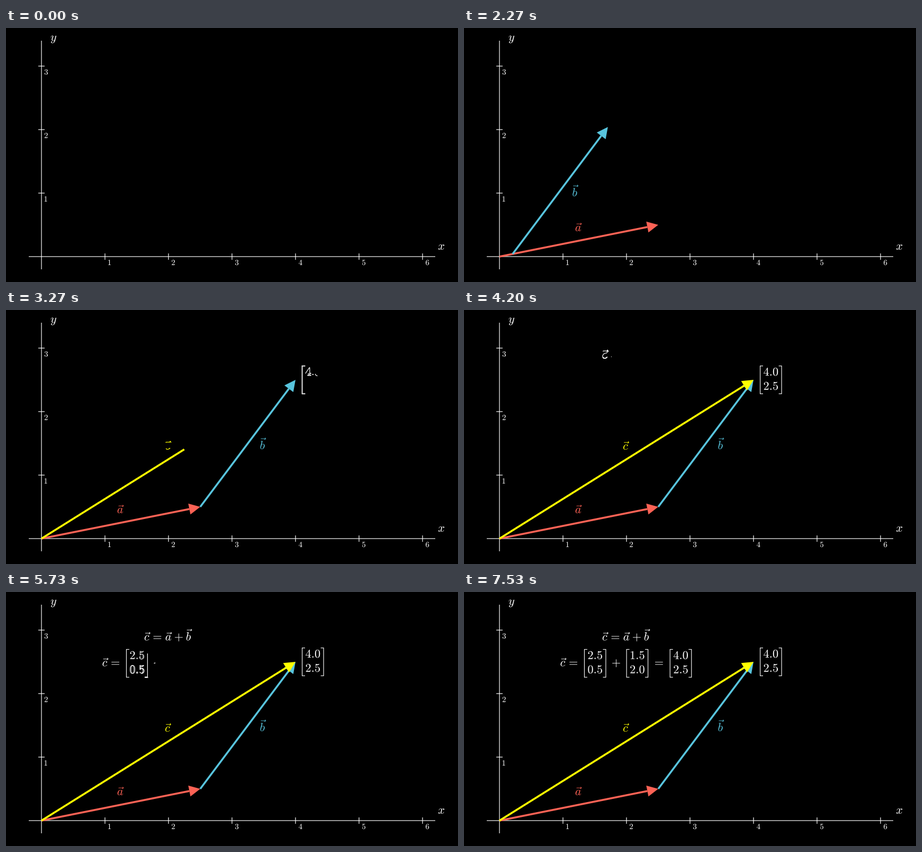
Recreate the animation shown at these times as a matplotlib script. Size 854x480 px, loop 10 s.

```python
import numpy as np
import matplotlib.pyplot as plt
from matplotlib.animation import FuncAnimation
from matplotlib.colors import to_rgb
from matplotlib.patches import PathPatch
from matplotlib.path import Path
from matplotlib.textpath import TextPath

plt.rcParams["mathtext.fontset"] = "cm"

W, H, DPI = 854, 480, 64
FPS, FRAMES = 15, 150
EM, SMALL_EM = 22.4, 14.95
ORIGIN, UNIT = np.array([67.0, 432.0]), 120
WHITE, RED, BLUE, YELLOW = "#FFFFFF", "#FC6255", "#58C4DD", "#FFFF00"
ADVANCE = {"a": 0.529, "b": 0.429, "c": 0.433, "=": 0.778, "+": 0.778, ".": 0.278}

fig = plt.figure(figsize=(W / DPI, H / DPI), dpi=DPI, facecolor="black")
ax = fig.add_axes([0, 0, 1, 1])
ax.set_xlim(0, W)
ax.set_ylim(H, 0)
ax.axis("off")


def points(px):
    return px * 72 / DPI


def smooth(t):
    t = min(max(t, 0), 1)
    edge = 1 / (1 + np.exp(5))
    return (1 / (1 + np.exp(-10 * (t - 0.5))) - edge) / (1 - 2 * edge)


def to_screen(x, y):
    return ORIGIN + UNIT * np.array([x, -y])


def compound(polys):
    return Path.make_compound_path(*[Path(p) for p in polys])


def partial(polys, fraction):
    """First part of the outlines, counted in segments."""
    left = fraction * sum(len(p) - 1 for p in polys)
    kept = []
    for p in polys:
        if left <= 1e-6:
            break
        whole = int(min(left, len(p) - 1))
        piece = p[:whole + 1]
        rest = left - whole
        if whole < len(p) - 1 and rest > 0:
            piece = np.vstack([piece, p[whole] + rest * (p[whole + 1] - p[whole])])
        kept.append(piece)
        left -= len(p) - 1
    return kept


# ---- outlines of symbols -------------------------------------------------

def outline(tex, em):
    path = TextPath((0, 0), f"${tex}$", size=100)
    return [p * [em / 100, -em / 100] for p in path.to_polygons()]


def bounds(polys):
    everything = np.vstack(polys)
    return everything.min(axis=0), everything.max(axis=0)


def char(c, x, y):
    """Symbol centred in its advance width, on baseline y."""
    polys = outline(c, EM)
    low, high = bounds(polys)
    shift = [x + ADVANCE.get(c, 0.5) * EM / 2 - (low[0] + high[0]) / 2, y]
    return [p + shift for p in polys]


def vector_symbol(letter, x, y):
    body = char(letter, x, y)
    low, high = bounds(body)
    arrow = min(outline(r"\vec{c}", EM), key=lambda p: p[:, 1].mean())
    a_low, a_high = bounds([arrow])
    rise = 0.879 if letter == "b" else 0.615
    centre = np.array([(low[0] + high[0]) / 2 + 0.075 * EM, y - rise * EM])
    return [[arrow + centre - (a_low + a_high) / 2], body]


def bracket(x, y, side):
    """Square bracket with its upright at x; side is 1 for left, -1 for right."""
    h, foot, t = 1.2 * EM, 6 * side, 1.15
    s = t * side
    shape = [(0, h), (foot, h), (foot, h - t), (s, h - t), (s, t - h),
             (foot, t - h), (foot, -h), (0, -h), (0, h)]
    return [np.array(shape) + [x, y]]


def matrix(x, y, rows):
    """Column of two numbers; x is the cell's left edge, y the centre."""
    parts = [bracket(x - 6.5, y, 1)]
    for number, drop in zip(rows, (-0.36, 0.84)):
        cursor = x
        for c in number:
            parts.append(char(c, cursor, y + drop * EM))
            cursor += ADVANCE.get(c, 0.5) * EM
    return parts + [bracket(x + 1.278 * EM + 6.5, y, -1)]


def equation(x, y, tokens):
    parts = []
    for token in tokens:
        if token in ("=", "+"):
            gap = (0.278 if token == "=" else 0.222) * EM
            parts.append(char(token, x + gap, y))
            x += ADVANCE[token] * EM + 2 * gap
        elif token in ("a", "b", "c"):
            parts += vector_symbol(token, x, y)
            x += ADVANCE[token] * EM
        else:
            parts += matrix(x + 0.528 * EM, y - 0.25 * EM, token.split())
            x += (1.278 + 2 * 0.528) * EM
    return parts


# ---- animated parts ------------------------------------------------------

class Glyph:
    def __init__(self, polys, color, zorder=5):
        self.polys, self.rgb = polys, to_rgb(color)
        self.patch = PathPatch(compound(polys), zorder=zorder, snap=False, visible=False)
        ax.add_patch(self.patch)

    def draw(self, progress, opacity=1, shift=(0, 0)):
        """Trace the border in the first half, fill it in the second."""
        self.patch.set_visible(progress > 0 and opacity > 0)
        if not self.patch.get_visible():
            return
        border = min(2 * progress, 1)
        fill = min(max(2 * progress - 1, 0), 1)
        moved = [p + np.asarray(shift) for p in self.polys]
        self.patch.set_path(compound(partial(moved, border)))
        self.patch.set_facecolor((*self.rgb, fill * opacity))
        self.patch.set_edgecolor((*self.rgb, 1) if fill < 0.999 else "none")
        self.patch.set_linewidth(points(1.2 * (1 - fill)))


class Writing:
    def __init__(self, parts, color, start, run=1):
        self.glyphs = [Glyph(p, color) for p in parts]
        self.start, self.run = start, run

    def draw(self, t, opacity=1, shift=(0, 0)):
        n = len(self.glyphs)
        lag = min(4 / n, 0.2)
        alpha = min(max((t - self.start) / self.run, 0), 1)
        value = alpha * ((n - 1) * lag + 1)
        for i, glyph in enumerate(self.glyphs):
            glyph.draw(value - i * lag, opacity, shift)


class Arrow:
    SIZE = 21

    def __init__(self, end, color, start, zorder):
        tail, tip = to_screen(0, 0), to_screen(*end)
        d = (tip - tail) / np.hypot(*(tip - tail))
        side = np.array([d[1], -d[0]]) * self.SIZE / 2
        base = tip - d * self.SIZE
        self.line = [np.array([tail, base])]
        self.head = [np.array([tip, base + side, base - side, tip])]
        self.start = start
        self.shaft = PathPatch(compound(self.line), fill=False, ec=color,
                               lw=points(3.6), zorder=zorder, snap=False)
        self.point = PathPatch(compound(self.head), fc=color, lw=0,
                               zorder=zorder, snap=False)
        ax.add_patch(self.shaft)
        ax.add_patch(self.point)

    def draw(self, t, shift=(0, 0)):
        value = 2 * min(max(t - self.start, 0), 1)
        for i, (patch, polys) in enumerate([(self.shaft, self.line), (self.point, self.head)]):
            amount = smooth(value - i)
            patch.set_visible(amount > 1e-6)
            if patch.get_visible():
                patch.set_path(compound(partial([p + np.asarray(shift) for p in polys], amount)))


# ---- static axes ---------------------------------------------------------

def line(x0, y0, x1, y1):
    ax.add_patch(PathPatch(Path([(x0, y0), (x1, y1)]), fill=False, ec=WHITE,
                           lw=points(1.2), zorder=1, snap=False))


def label(tex, em, left, top):
    polys = outline(tex, em)
    shift = np.array([left, top]) - bounds(polys)[0]
    Glyph([p + shift for p in polys], WHITE, zorder=1).draw(1)


def draw_axes():
    line(43, 432, 811, 432)
    line(67, 24, 67, 456)
    for i in range(1, 7):
        x, _ = to_screen(i, 0)
        line(x, 426, x, 438)
        label(i, SMALL_EM, x + 6, 438)
    for i in range(1, 4):
        _, y = to_screen(0, i)
        line(61, y, 73, y)
        label(i, SMALL_EM, 72.7, y + 6)
    label("x", EM, 817, 409)
    label("y", EM, 84.6, 14.3)


draw_axes()

arrow_a = Arrow((2.5, 0.5), RED, 0, 2)
arrow_b = Arrow((1.5, 2), BLUE, 0, 3)
arrow_c = Arrow((4, 2.5), YELLOW, 3, 4)
label_a = Writing(vector_symbol("a", 209.9, 384), RED, 0)
label_b = Writing(vector_symbol("b", 179.8, 323), BLUE, 0)
label_c = Writing(vector_symbol("c", 300.5, 264), YELLOW, 3)
coords_a = Writing(matrix(385.5, 372, ["2.5", "0.5"]), WHITE, 0)
coords_b = Writing(matrix(265.5, 192, ["1.5", "2.0"]), WHITE, 0)
coords_c = Writing(matrix(565.5, 132, ["4.0", "2.5"]), WHITE, 3)
sum_symbols = Writing(equation(261.3, 91.6, "c=a+b"), WHITE, 4)
sum_numbers = Writing(
    equation(182, 140.4, ["c", "=", "2.5 0.5", "+", "1.5 2.0", "=", "4.0 2.5"]),
    WHITE, 5, run=2)


def update(frame):
    t = frame / FPS
    fade = 1 - smooth(t - 1)
    slide = smooth(t - 2) * (to_screen(2.5, 0.5) - ORIGIN)
    for part in (arrow_a, arrow_c, label_a, label_c, coords_c, sum_symbols, sum_numbers):
        part.draw(t)
    for part in (coords_a, coords_b):
        part.draw(t, opacity=fade if t < 2 else 0)
    for part in (arrow_b, label_b):
        part.draw(t, shift=slide)
    return []


anim = FuncAnimation(fig, update, frames=FRAMES, interval=10000 / FRAMES,
                     repeat=True, repeat_delay=0, blit=False)
plt.show()
```
